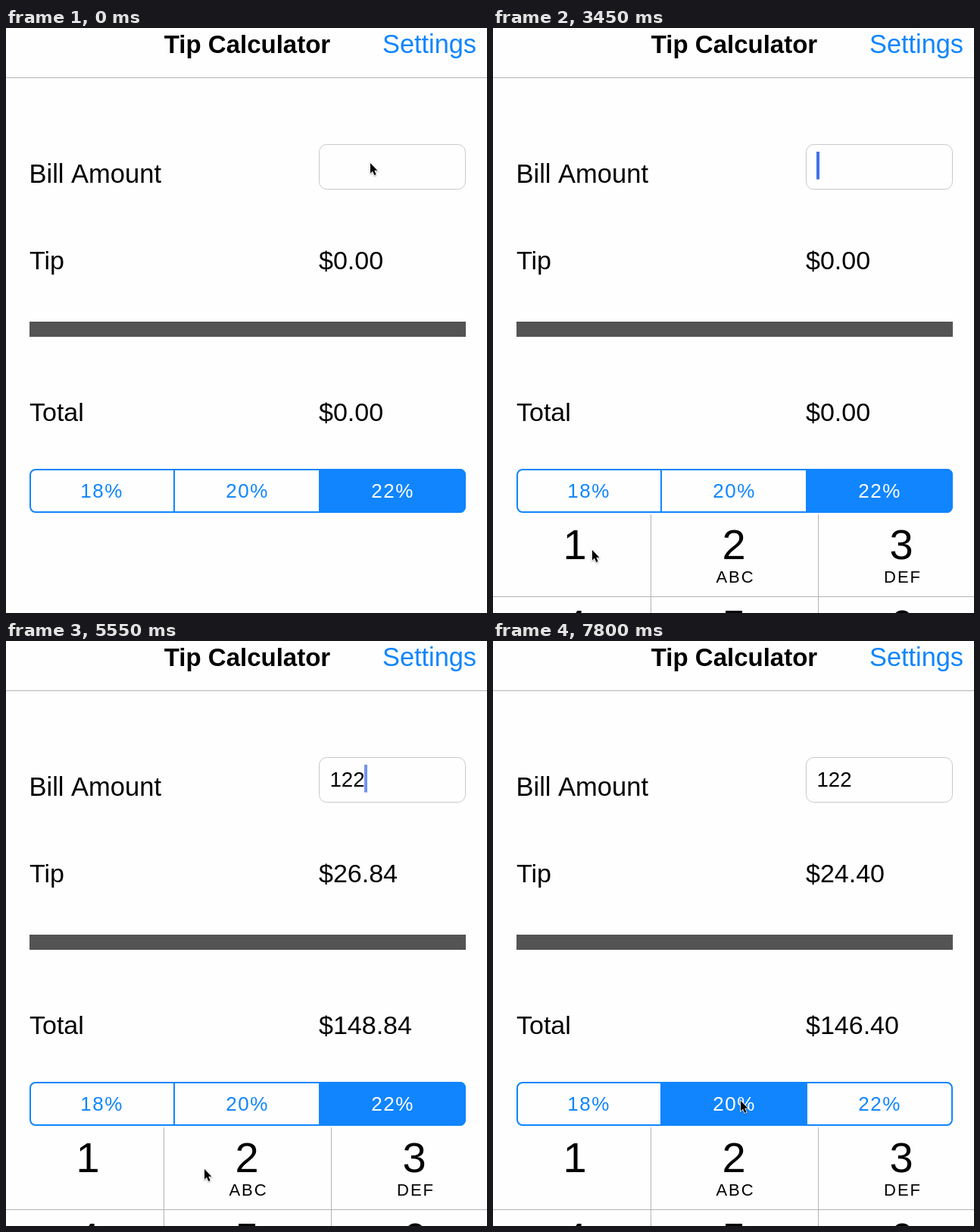
An HTML page with a canvas that plays this animation: 635 px wide and 771 px high, repeating every 8 s.

```html
<!DOCTYPE html>
<html lang="en">
<head>
<meta charset="utf-8">
<title>Tip Calculator</title>
<style>
html, body { margin: 0; width: 100%; height: 100%; overflow: hidden; background: #fefefe; }
canvas { display: block; }
</style>
</head>
<body>
<canvas id="stage" width="635" height="771"></canvas>
<script>
const ctx = document.getElementById('stage').getContext('2d');
const LOOP = 8000, STEP = 150;
const PAPER = '#fefefe', BLUE = '#1085fe', LINE = '#b4b4b4';
const FOCUS = 450, TAPS = [3900, 4800, 5100], SWITCH = 7800;

// The pointer rests at START between moves of the form [begin, end, x, y].
const START = [481, 178];
const MOVES = [
  [2400, 3150, 131, 688], [4050, 4650, 262, 696], [5850, 6450, 339, 606], [6900, 7050, 327, 606]
];

const clamp = v => Math.max(0, Math.min(1, v));
const ease = p => p * p * (3 - 2 * p);

function pointerAt(t) {
  return MOVES.reduce(([x, y], [begin, end, toX, toY]) => {
    const e = ease(clamp((t - begin) / (end - begin)));
    return [x + (toX - x) * e, y + (toY - y) * e];
  }, START);
}

// The caret blinks once a second, restarting at every key tap.
function caretAlpha(t) {
  if (t < FOCUS) return 0;
  const phase = (t - [FOCUS, ...TAPS].findLast(tap => tap <= t)) % 1000;
  return Math.max(clamp((600 - phase) / 200), clamp((phase - 900) / 100));
}

function rect(x, y, w, h, color) {
  ctx.fillStyle = color;
  ctx.fillRect(x, y, w, h);
}

function text(str, x, y, { size = 34, color = '#000', align = 'left', bold = '', gap = 0 } = {}) {
  ctx.font = `${bold} ${size}px "Liberation Sans", Arial, sans-serif`;
  ctx.letterSpacing = gap + 'px';
  ctx.textAlign = align;
  ctx.fillStyle = color;
  ctx.fillText(str, x, y);
}

function outline(x, y, w, h, radius, width, color) {
  ctx.beginPath();
  ctx.roundRect(x, y, w, h, radius);
  ctx.lineWidth = width;
  ctx.strokeStyle = color;
  ctx.stroke();
}

function drawForm(t) {
  const bill = '122'.slice(0, TAPS.filter(tap => tap <= t).length);
  const rate = t < SWITCH ? 22 : 20;
  const tip = bill * rate / 100, total = +bill + tip;

  text('Tip Calculator', 318.5, 33, { size: 33, align: 'center', bold: 'bold' });
  text('Settings', 497, 33, { size: 34.3, color: BLUE });
  rect(0, 65, 635, 1, LINE);

  text('Bill Amount', 30.5, 204, { size: 34.5 });
  text('Tip', 31, 318);
  text('Total', 31, 518);
  text('$' + tip.toFixed(2), 413, 318);
  text('$' + total.toFixed(2), 413, 518);
  rect(31, 387, 576, 20, '#545454');

  outline(413.5, 153.5, 193, 59, 10, 1, '#c8c8c8');
  text(bill, 427.5, 192, { size: 27.6 });
  ctx.globalAlpha = caretAlpha(t);
  rect(427 + Math.round(bill.length * 15.35), 163, 4, 36.5, '#4272e8');
  ctx.globalAlpha = 1;

  drawSegments(rate);
}

function drawSegments(rate) {
  ctx.save();
  ctx.beginPath();
  ctx.roundRect(31, 581, 576, 58, 8);
  ctx.clip();
  [18, 20, 22].forEach((value, i) => {
    const x = 31 + 192 * i, on = value === rate;
    if (on) rect(x, 581, 192, 58, BLUE);
    if (i) rect(x - 2, 581, 2, 58, BLUE);
    text(value + '%', x + 95.5, 619, {
      size: 26, align: 'center', gap: 1.5, color: on ? '#fff' : BLUE
    });
  });
  ctx.restore();
  outline(32, 582, 574, 56, 7, 2, BLUE);
}

function drawKeyboard(t) {
  const left = 1 - clamp((t - 435) / 450);
  ctx.save();
  ctx.translate(0, Math.round(432 * left ** 3));
  rect(0, 641, 635, 432, PAPER);
  if (t >= 4950 && t < 5100) rect(208, 641, 222, 108, '#babdc2');
  rect(208, 641, 1, 432, LINE);
  rect(429, 641, 1, 432, LINE);
  rect(0, 749, 635, 1, LINE);
  ['', 'ABC', 'DEF'].forEach((letters, i) => {
    const x = [108, 318, 539][i];
    text(i + 1, x, 700, { size: 56, align: 'center' });
    text(i + 4, x, 806, { size: 56, align: 'center' });
    text(letters, x + 2, 731, { size: 22, align: 'center', gap: 2 });
  });
  ctx.restore();
}

function drawPointer(t) {
  ctx.save();
  ctx.translate(...pointerAt(t));
  ctx.shadowColor = 'rgba(0,0,0,.35)';
  ctx.shadowBlur = 2;
  ctx.shadowOffsetY = 1;
  const arrow = new Path2D('M0 0V13.5L3 10.7L5.3 16L7.6 15L5.3 9.8H9.4Z');
  ctx.lineWidth = 1.6;
  ctx.strokeStyle = '#fff';
  ctx.stroke(arrow);
  ctx.shadowColor = 'transparent';
  ctx.fillStyle = '#000';
  ctx.fill(arrow);
  ctx.restore();
}

function frame() {
  const now = performance.now() % LOOP;
  const t = Math.floor(now / STEP) * STEP;
  rect(0, 0, 635, 771, PAPER);
  drawForm(t);
  drawKeyboard(t);
  drawPointer(t);
  requestAnimationFrame(frame);
}
frame();
</script>
</body>
</html>
```
